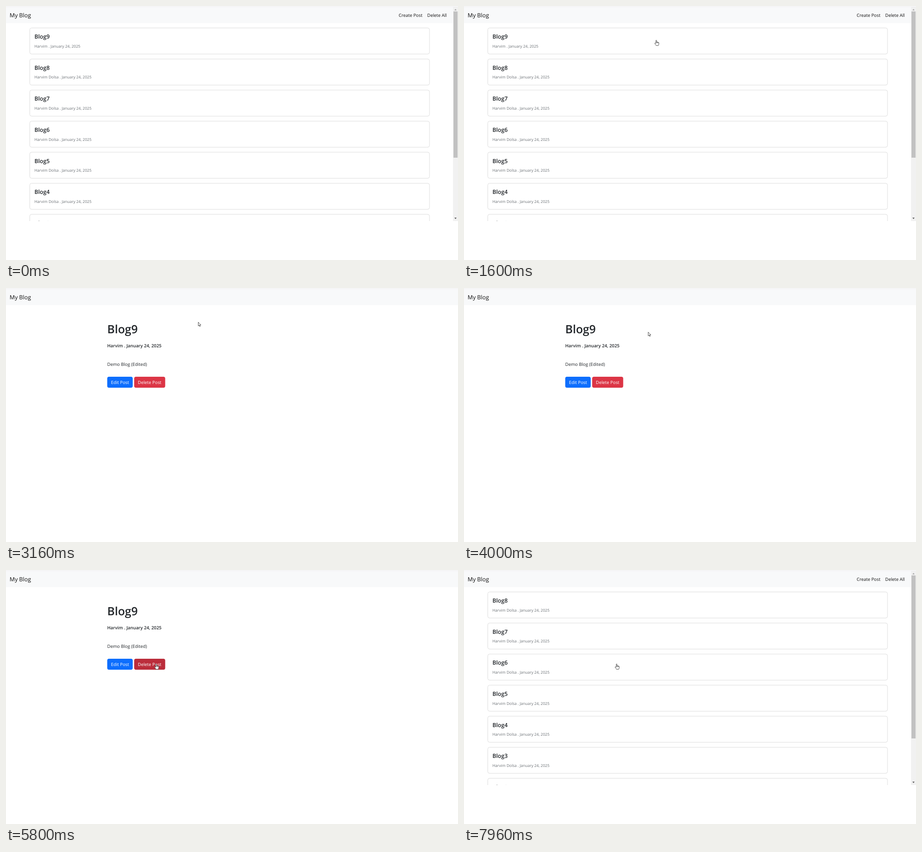
An HTML page for the animation above (8 s loop, 998x561 px).

```html
<!DOCTYPE html>
<html lang="en">
<head>
<meta charset="utf-8">
<title>My Blog</title>
<style>
  html, body { margin: 0; width: 100%; height: 100%; overflow: hidden; background: #fff; }
  svg { display: block; }
  text { font: 9.8px "Open Sans", "Noto Sans", sans-serif; fill: #212529; text-rendering: geometricPrecision; }
  .brand { font-size: 12.67px; fill: #111; }
  .link { fill: #111; }
  .title { font-size: 12.6px; font-weight: 600; }
  .meta { font-size: 8.54px; fill: #6b7075; }
  .heading { font-size: 25.2px; font-weight: 600; }
  .byline { font-weight: 600; }
  .label { fill: #fff; }
  .card { fill: #fff; stroke: #dcdcdc; }
  .cursor { fill: #fff; stroke: #222; stroke-width: .8; stroke-linejoin: round; }
</style>
</head>
<body>
<svg width="998" height="561" viewBox="0 0 998 561">
  <defs><clipPath id="viewport"><rect width="998" height="475"/></clipPath></defs>
  <rect y="1" width="998" height="37" fill="#f8f9fa"/>
  <rect y="1" width="998" height="1" fill="#ebebec"/>
  <text class="brand" x="8" y="24.8">My Blog</text>

  <g id="list" clip-path="url(#viewport)">
    <text class="link" x="867" y="23.8">Create Post</text>
    <text class="link" x="930" y="23.8">Delete All</text>
    <g id="cards"></g>
    <rect x="987" y="2" width="11" height="473" fill="#f1f1f1"/>
    <rect id="thumb" x="988" y="12" width="9" fill="#c1c1c1"/>
    <path d="M990 9.5l2.5-3 2.5 3z" fill="#a3a3a3"/>
    <path d="M990 467.5l2.5 3 2.5-3z" fill="#505050"/>
  </g>

  <g id="post">
    <text class="heading" x="223.5" y="100">Blog9</text>
    <text class="byline" x="223.5" y="131.4">Harvim . January 24, 2025</text>
    <text x="223.5" y="171.5">Demo Blog (Edited)</text>
    <rect x="223.5" y="196" width="56.3" height="24.3" rx="4" fill="#0d6efd"/>
    <text class="label" x="231.8" y="212.4">Edit Post</text>
    <rect id="delete" x="283" y="196" width="68.5" height="24.3" rx="4"/>
    <text class="label" x="291" y="212.4">Delete Post</text>
  </g>

  <g id="cursor" class="cursor">
    <path id="arrow" d="M0 0V8.4L2 6.6 3.3 9.5 4.5 9 3.2 6.1H5.8Z"/>
    <g id="hand">
      <path d="M-.9 7V.9Q-.9 0 0 0T.9 .9V4.1Q1.8 3.5 2.6 4.4 3.5 3.9 4.2 4.8 5.6 4.5 5.7 6V8.4Q5.5 10.2 4.5 11.8H-.3Q-1.2 10-3 8.1-4 6.7-2.9 6.3-2 6.1-.9 7.4Z"/>
      <path d="M.9 4.1V6.3M2.6 4.4V6.4M4.2 4.8V6.5" fill="none"/>
    </g>
  </g>
</svg>
<script>
const LOOP = 8000;
const OPEN_POST = 2840;
const POST_DELETED = 6160;
const CARD_PITCH = 68.6;

// Pointer path: time, x, y of the tip
const path = [
  [400, 432, -14], [760, 424.5, 75.5],
  [3840, 424.5, 75.5], [4000, 407, 97], [4200, 352, 180], [4480, 331.5, 207.5],
  [7600, 331.5, 207.5], [7760, 337, 207.5]
];

const el = id => document.getElementById(id);
const show = (id, visible) => el(id).style.display = visible ? '' : 'none';

function card(number, row) {
  const author = number === 9 ? 'Harvim' : 'Harvim Dolsa';
  return `<g transform="translate(0 ${row * CARD_PITCH})">
    <rect class="card" x="52.5" y="48.5" width="882.5" height="57.6" rx="4"/>
    <text class="title" x="62.8" y="72.2">Blog${number}</text>
    <text class="meta" x="62.8" y="91.8">${author} . January 24, 2025</text></g>`;
}

let listedFrom = 0;
function showList(newest) {
  if (listedFrom === newest) return;
  listedFrom = newest;
  el('cards').innerHTML = Array.from({ length: 7 }, (_, row) => card(newest - row, row)).join('');
  el('thumb').setAttribute('height', newest === 9 ? 323 : 360);
}

function pointerAt(time) {
  const next = path.findIndex(([t]) => t > time);
  if (next < 1) return path.at(next).slice(1);
  const [t0, x0, y0] = path[next - 1], [t1, x1, y1] = path[next];
  const k = (time - t0) / (t1 - t0);
  return [x0 + (x1 - x0) * k, y0 + (y1 - y0) * k];
}

function draw(time) {
  const onPost = time >= OPEN_POST && time < POST_DELETED;
  const [x, y] = pointerAt(time);
  const overDelete = onPost && x > 283 && x < 351.5 && y > 196 && y < 220;
  const overCard = !onPost && y > 48;

  showList(time < POST_DELETED ? 9 : 8);
  show('list', !onPost);
  show('post', onPost);
  el('delete').setAttribute('fill', overDelete ? '#bb2d3b' : '#dc3545');

  const clickable = overDelete || overCard;
  show('hand', clickable);
  show('arrow', !clickable);
  el('cursor').setAttribute('transform', `translate(${x} ${y})`);
}

function frame() {
  draw(performance.now() % LOOP);
  requestAnimationFrame(frame);
}
frame();
</script>
</body>
</html>
```
